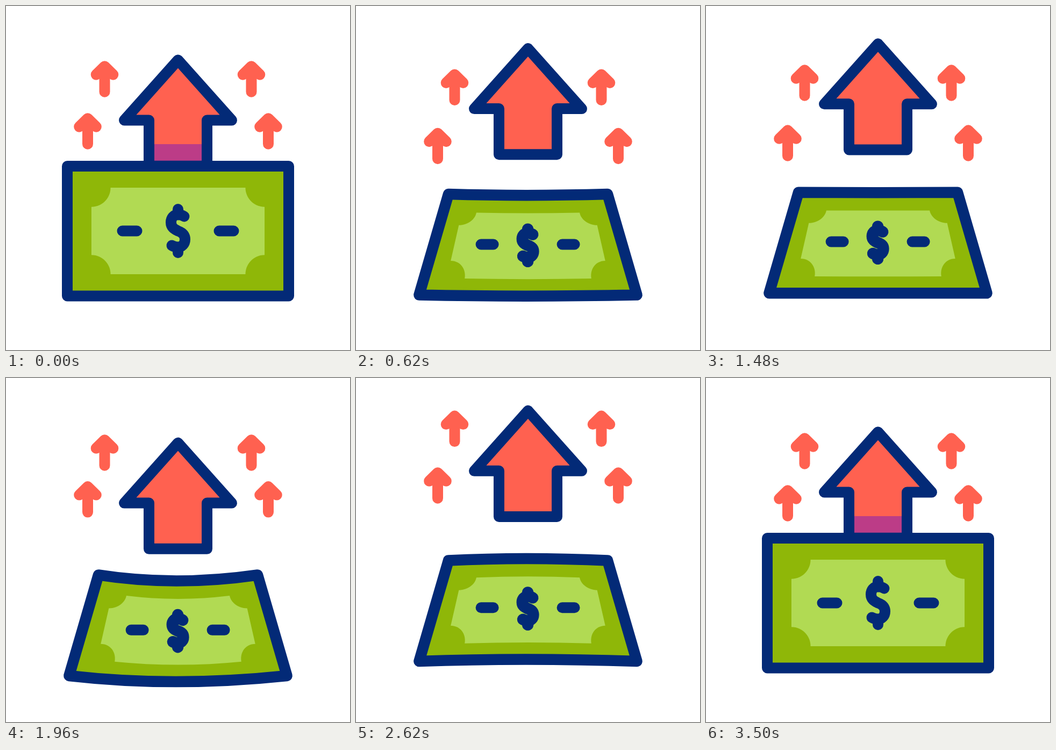
Animation of 640x640 px, one loop 3600 ms. Source, as an HTML page with a canvas:

```html
<!DOCTYPE html>
<html lang="en">
<head>
<meta charset="utf-8">
<title>Rising money</title>
<style>
  html, body { margin: 0; width: 100%; height: 100%; overflow: hidden; background: #fff; }
  canvas { display: block; width: 640px; height: 640px; }
</style>
</head>
<body>
<canvas id="stage" width="640" height="640"></canvas>
<script>
const ctx = document.getElementById('stage').getContext('2d');
const NAVY = '#032a77', RED = '#ff6150', GREEN = '#8fb708', LIME = '#b1da53', SHADE = '#bc3c87';
const LOOP = 3600, LAST = 3500, STEP = 20;

const lerp = (a, b, p) => a + (b - a) * p;

// Symmetric cubic-bezier(a, 0, 1 - a, 1)
function ease(x, a) {
  let lo = 0, hi = 1, s = 0.5;
  for (let i = 0; i < 24; i++) {
    s = (lo + hi) / 2;
    const at = 3 * a * s * (1 - s) ** 2 + 3 * (1 - a) * s * s * (1 - s) + s ** 3;
    if (at < x) lo = s; else hi = s;
  }
  return s * s * (3 - 2 * s);
}

// Keys are [time, value, easing strength of the segment that ends here]
function track(keys, t) {
  if (t <= keys[0][0]) return keys[0][1];
  for (let i = 1; i < keys.length; i++) {
    const [t0, v0] = keys[i - 1], [t1, v1, a = 0.5] = keys[i];
    if (t < t1) return lerp(v0, v1, ease((t - t0) / (t1 - t0), a));
  }
  return keys[keys.length - 1][1];
}

// Rest, three bounces, then back to rest
function bounce(rest, low, high, lag, lastTop, lastLow, end) {
  return [
    [0, rest],
    [405 + lag, low], [801 + lag, high],
    [1245 + lag, low], [1641 + lag, high],
    [2085 + lag, low], [lastTop, high],
    [lastLow, low, 0.33], [end, rest]
  ];
}

const arrowKeys = bounce(90, 123, 30, 0, 2480, 2945, 3365);
const upperKeys = bounce(102, 141.3, 46, 70, 2505, 2975, 3440);
const lowerKeys = bounce(199, 238, 152, 105, 2500, 2970, 3500);
const tiltKeys = [[0, 0], [400, 1], [2960, 1], [3345, 0]];
const swayKeys = [[400, 1], [800, 0], [1240, 1], [1640, 0], [2080, 1], [2510, 0], [2960, 1]];

function billPose(t) {
  const tilt = track(tiltKeys, t), sway = track(swayKeys, t);
  return {
    tilt,
    top: lerp(288, 326 + 35 * sway, tilt),
    bend: tilt * (19 * sway - 5.5)
  };
}

function strokeWith(color, width = 20) {
  ctx.lineWidth = width;
  ctx.lineCap = ctx.lineJoin = 'round';
  ctx.strokeStyle = color;
  ctx.stroke();
}

function drawBill({ tilt, top, bend }) {
  const map = (u, v, lift = 0) => [
    114 + 58 * tilt - 54.6 * tilt * v + u * (412 - 116 * tilt + 109.2 * tilt * v),
    top + 10 + v * (241.5 - 54 * tilt) + bend * lift
  ];
  const line = (...p) => ctx.lineTo(...map(...p));
  const curve = (control, end) => ctx.quadraticCurveTo(...map(...control), ...map(...end));

  ctx.beginPath();
  ctx.moveTo(...map(0, 0));
  curve([0.48, 0, 2], [1, 0]);
  line(1, 1);
  curve([0.48, 1, 2], [0, 1]);
  ctx.closePath();
  ctx.fillStyle = GREEN;
  ctx.fill();
  strokeWith(NAVY, 20 + 0.5 * tilt);

  // Inner panel with four scooped corners
  const u0 = 0.109, u1 = 0.891, v0 = 0.1656 + 0.0125 * tilt, v1 = 0.832;
  const ru = 0.0865, rTop = 0.148 - 0.023 * tilt, rBottom = 0.148 + 0.028 * tilt;
  const lift = 0.47, peak = 2 - lift;
  const scoop = (u, v, rv, from) => {
    for (let i = 0; i <= 14; i++) {
      const angle = (from - i / 14) * Math.PI / 2;
      line(u + ru * Math.cos(angle), v + rv * Math.sin(angle), lift);
    }
  };
  ctx.beginPath();
  scoop(u0, v0, rTop, 1);
  curve([0.5, v0, peak], [u1 - ru, v0, lift]);
  scoop(u1, v0, rTop, 2);
  scoop(u1, v1, rBottom, 3);
  curve([0.5, v1, peak], [u0 + ru, v1, lift]);
  scoop(u0, v1, rBottom, 4);
  ctx.closePath();
  ctx.fillStyle = LIME;
  ctx.fill();

  const dashY = map(0.5, 0.499 - 0.012 * tilt, 1)[1];
  const dashIn = lerp(76.5, 64, tilt), dashOut = lerp(103.5, 87, tilt);
  ctx.beginPath();
  for (const side of [-1, 1]) {
    ctx.moveTo(320 + side * dashOut - 0.4 * tilt, dashY);
    ctx.lineTo(320 + side * dashIn - 0.4 * tilt, dashY);
  }
  strokeWith(NAVY);

  // Dollar sign: only its centre line is squeezed, the stroke stays heavy
  ctx.save();
  ctx.translate(320 - 0.4 * tilt, dashY + 1.8 * tilt);
  ctx.scale(lerp(1, 0.8, tilt), lerp(1, 0.745, tilt));
  ctx.beginPath();
  ctx.moveTo(0, -40.5);
  ctx.lineTo(0, -30);
  ctx.moveTo(11.5, -27);
  ctx.bezierCurveTo(7, -30, 3, -30.5, 0, -30.5);
  ctx.bezierCurveTo(-8, -30.5, -13, -24, -13, -16);
  ctx.bezierCurveTo(-13, -6, -6, -3, 0, 0);
  ctx.bezierCurveTo(8, 3, 13, 7, 13, 15.5);
  ctx.bezierCurveTo(13, 24.5, 7, 30, 0, 30);
  ctx.bezierCurveTo(-5, 30, -8, 29, -11.5, 27);
  ctx.moveTo(0, 30);
  ctx.lineTo(0, 40.5);
  ctx.restore();
  strokeWith(NAVY, 20 + 1.3 * tilt);
}

function drawArrow(y, billTop) {
  const half = [[0, 10.5], [100, 122.5], [54, 122.5], [54, 207.7]];
  ctx.beginPath();
  for (const [x, dy] of half) ctx.lineTo(320 + x, y + dy);
  for (const [x, dy] of half.slice(1).reverse()) ctx.lineTo(320 - x, y + dy);
  ctx.closePath();
  ctx.fillStyle = RED;
  ctx.fill();
  const shadeTop = billTop - 31, base = y + 207.7;
  if (shadeTop < base) {
    ctx.fillStyle = SHADE;
    ctx.fillRect(266, shadeTop, 108, base - shadeTop);
  }
  strokeWith(NAVY);
}

function drawSmallArrow(x, y) {
  ctx.beginPath();
  ctx.moveTo(x - 15.8, y + 25.7);
  ctx.lineTo(x, y + 10.2);
  ctx.lineTo(x + 15.8, y + 25.7);
  ctx.moveTo(x, y + 18);
  ctx.lineTo(x, y + 57.7);
  strokeWith(RED);
}

function draw(t) {
  ctx.fillStyle = '#fff';
  ctx.fillRect(0, 0, 640, 640);
  const bill = billPose(t);
  const upper = track(upperKeys, t), lower = track(lowerKeys, t);
  drawBill(bill);
  drawArrow(track(arrowKeys, t), bill.top);
  drawSmallArrow(183.5, upper);
  drawSmallArrow(456.5, upper);
  drawSmallArrow(152, lower);
  drawSmallArrow(488, lower);
}

const start = performance.now();
function tick() {
  const t = (performance.now() - start) % LOOP;
  draw(Math.min(LAST, Math.floor(t / STEP) * STEP));
  requestAnimationFrame(tick);
}
tick();
</script>
</body>
</html>
```
